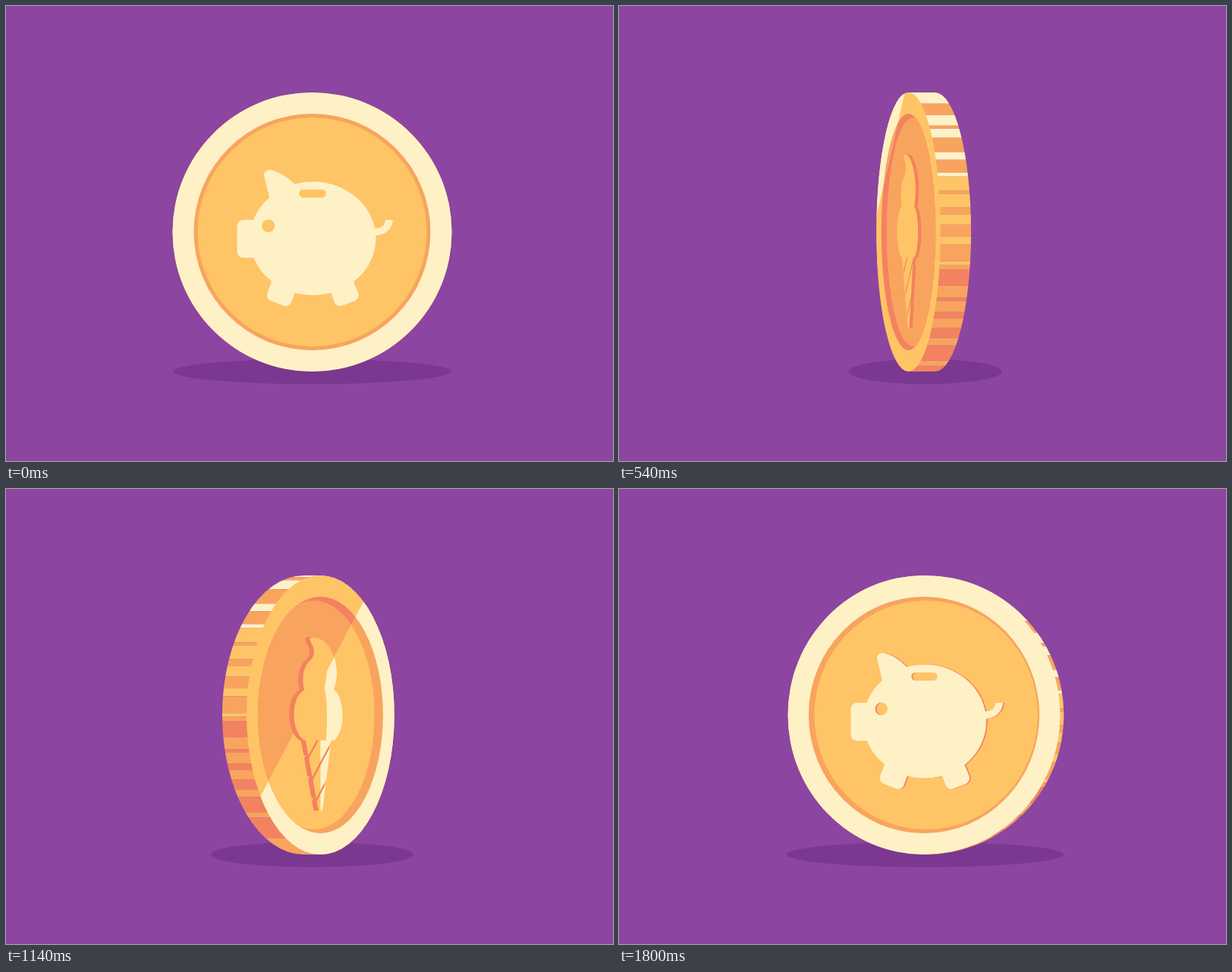
These frames come from a looping animation (800x600 px, 1.83 s). An HTML page with a canvas:

```html
<!DOCTYPE html>
<html lang="en">
<head>
<meta charset="utf-8">
<title>Spinning coin</title>
<style>
html, body { margin: 0; width: 100%; height: 100%; overflow: hidden; background: #8c45a0; }
canvas { display: block; width: 800px; height: 600px; }
</style>
</head>
<body>
<canvas id="stage" width="800" height="600"></canvas>
<script>
const ctx = document.getElementById('stage').getContext('2d');
const CX = 403.5, CY = 298, R = 184;
const BG = '#8c45a0', SHADE = '#7a3891';
const CREAM = '#fef1c6', YELLOW = '#ffc466', ORANGE = '#f8a45e', RED = '#f38260';
const DIM = { rim: YELLOW, wall: RED, floor: ORANGE };
const LIT = { rim: CREAM, wall: ORANGE, floor: YELLOW };

// Edge bands: colour and lower end, at the middle of the turn
const BANDS = [
  [CREAM, 108], [ORANGE, 123], [CREAM, 137], [ORANGE, 141], [CREAM, 153], [ORANGE, 172],
  [CREAM, 182], [ORANGE, 199], [CREAM, 204], [YELLOW, 223], [ORANGE, 227], [YELLOW, 245],
  [ORANGE, 254], [YELLOW, 268], [ORANGE, 283], [YELLOW, 294], [ORANGE, 316], [YELLOW, 321],
  [ORANGE, 327], [RED, 348], [ORANGE, 364], [RED, 368], [ORANGE, 383], [RED, 391],
  [ORANGE, 404], [RED, 417], [ORANGE, 427], [RED, 447], [ORANGE, 454], [RED, 481], [ORANGE, 700]
];

// Sideways drift of one disc through a full turn: step, pixels
const DRIFT = [
  [0, 0], [3, 4.5], [10, 13.5], [13, 17], [15, 18], [18, 13], [22, 8], [30, 0],
  [33, -2], [40, -14.5], [43, -20.5], [45, -23], [48, -22], [52, -14.5], [59, -1.5], [60, 0]
];

function drift(n) {
  n %= 60;
  const i = DRIFT.findIndex(k => k[0] > n);
  const [n0, a] = DRIFT[i - 1], [n1, b] = DRIFT[i];
  return a + (b - a) * (n - n0) / (n1 - n0);
}

// Symmetric cubic ease with handle length h
function ease(x, h) {
  let lo = 0, hi = 1;
  for (let i = 0; i < 30; i++) {
    const t = (lo + hi) / 2, u = 1 - t;
    const v = 3 * u * u * t * h + 3 * u * t * t * (1 - h) + t * t * t;
    if (v < x) lo = t; else hi = t;
  }
  return lo * lo * (3 - 2 * lo);
}

const squash = (m, h) => Math.abs(1 - 2 * ease(m / 30, h));

// Polygon with rounded corners; points are [x, y, radius]
function poly(p, pts) {
  const a = pts[pts.length - 1], b = pts[0];
  p.moveTo((a[0] + b[0]) / 2, (a[1] + b[1]) / 2);
  pts.forEach((q, i) => {
    const r = pts[(i + 1) % pts.length];
    if (q[2]) p.arcTo(q[0], q[1], r[0], r[1], q[2]);
    else p.lineTo(q[0], q[1]);
  });
  p.closePath();
}

function makePig() {
  const p = new Path2D();
  p.ellipse(1, 8.5, 83, 75, 0, 0, 7);
  p.closePath();
  poly(p, [[-99, -16, 8], [-70, -16], [-70, 34], [-99, 34, 8]]);
  // ear
  p.moveTo(-56, -44);
  p.lineTo(-63.5, -74);
  p.quadraticCurveTo(-64, -82, -55, -82);
  p.quadraticCurveTo(-39, -79, -23, -63);
  p.lineTo(-10, -30);
  p.closePath();
  // legs
  poly(p, [[-53, 64], [-22, 78], [-30, 100, 8], [-62, 88, 8]]);
  poly(p, [[54, 64], [64, 88, 8], [32, 100, 8], [24, 78]]);
  // tail
  p.moveTo(96.5, -16);
  p.lineTo(106.5, -16);
  p.bezierCurveTo(106, -4, 96, 5, 81, 5);
  p.lineTo(81, -5);
  p.bezierCurveTo(90, -4, 96, -8, 96.5, -16);
  p.closePath();
  // eye and slot run the other way round to stay open
  p.moveTo(-49.2, -8);
  p.arc(-57.7, -8, 8.5, 0, Math.PI * 2, true);
  p.closePath();
  p.moveTo(-12, -56);
  p.arc(-12, -50.8, 5.2, -Math.PI / 2, Math.PI / 2, true);
  p.lineTo(13, -45.6);
  p.arc(13, -50.8, 5.2, Math.PI / 2, -Math.PI / 2, true);
  p.closePath();
  return p;
}

function makeCone() {
  const p = new Path2D();
  p.moveTo(-26, -99);
  p.bezierCurveTo(-27, -103, -20, -103, -12, -102);
  p.bezierCurveTo(16, -100, 41, -79, 41, -55);
  p.quadraticCurveTo(40, -43, 33, -33);
  p.bezierCurveTo(46, -30, 55, -16, 55, 0);
  p.bezierCurveTo(55, 16, 47, 27, 35, 33.5);
  p.lineTo(-40, 33.5);
  p.bezierCurveTo(-56, 28, -66, 15, -66, 0);
  p.bezierCurveTo(-66, -17, -56, -29, -40, -33);
  p.bezierCurveTo(-47, -46, -43, -62, -31, -69);
  p.bezierCurveTo(-20, -75, -16, -77, -16, -84);
  p.bezierCurveTo(-16, -91, -23, -93, -26, -99);
  p.closePath();
  // wafer strips between diagonals x + y = s
  const left = s => { const y = (s + 48.35) / 1.344; return [s - y, y]; };
  const right = s => { const y = Math.max(33, (s - 34.82) / 0.763); return [s - y, y]; };
  poly(p, [[-37, 33], right(23.5), left(23.5)]);
  poly(p, [left(28.5), right(28.5), [27, 33], right(61.5), left(61.5)]);
  poly(p, [left(66.5), right(66.5), right(99.5), left(99.5)]);
  poly(p, [left(104.5), right(104.5), [5, 126, 2], [-5, 126, 2]]);
  return p;
}

function makeConeLight() {
  const p = new Path2D();
  p.moveTo(-22, -104);
  p.lineTo(-20, -100);
  p.bezierCurveTo(2, -98, 16, -84, 16, -66);
  p.quadraticCurveTo(16, -49, 10, -36);
  p.bezierCurveTo(17, -22, 18, 8, 14, 33.5);
  p.lineTo(0, 33.5);
  p.lineTo(0, 130);
  p.lineTo(80, 130);
  p.lineTo(80, -104);
  p.closePath();
  return p;
}

const PIG = makePig(), CONE = makeCone(), CONE_LIGHT = makeConeLight();

function disc(r, fill, x = 0) {
  ctx.beginPath();
  ctx.arc(x, 0, r, 0, Math.PI * 2);
  ctx.fillStyle = fill;
  ctx.fill();
}

function edge(front, fw, rear, rw, shift) {
  ctx.save();
  ctx.beginPath();
  ctx.ellipse(rear, CY, R * rw, R, 0, 0, Math.PI * 2);
  ctx.closePath();
  ctx.rect(Math.min(front, rear), CY - R, Math.abs(front - rear), 2 * R);
  ctx.moveTo(front + R * fw, CY);
  ctx.ellipse(front, CY, R * fw, R, 0, 0, Math.PI * 2);
  ctx.clip();
  let top = -100;
  for (const [fill, end] of BANDS) {
    ctx.fillStyle = fill;
    ctx.fillRect(200, top, 400, end + shift - top);
    top = end + shift;
  }
  ctx.restore();
}

function face(pal, floorX) {
  disc(R, pal.rim);
  disc(156, pal.wall);
  ctx.save();
  ctx.beginPath();
  ctx.arc(0, 0, 156, 0, Math.PI * 2);
  ctx.clip();
  disc(151, pal.floor, floorX);
  ctx.restore();
}

// Clip to one side of the diagonal x + y = s
function clipDiagonal(s, side) {
  const far = side * 900;
  ctx.beginPath();
  ctx.moveTo(s - 600, 600);
  ctx.lineTo(s + 600, -600);
  ctx.lineTo(s + 600 + far, -600 + far);
  ctx.lineTo(s - 600 + far, 600 + far);
  ctx.clip();
}

function emblem(shape, w, depth) {
  const steps = Math.ceil(Math.abs(depth) * 2);
  ctx.fillStyle = RED;
  for (let i = steps; i > 0; i--) {
    ctx.save();
    ctx.translate(depth * i / steps / w, 0);
    ctx.fill(shape);
    ctx.restore();
  }
  ctx.fillStyle = YELLOW;
  ctx.fill(shape);
}

function draw(n) {
  const m = n % 30, away = m < 15, side = away ? 1 : -1;
  const pigSide = n < 15 || n >= 45;
  const front = CX + drift(pigSide ? n : n + 30);
  const rear = CX + drift(pigSide ? n + 30 : n);
  const w = squash(m, 0.13), rw = squash(m, 0.23);
  const depth = -side * 8.7 * Math.pow(Math.abs(Math.sin(Math.PI * (15 - m) / 15)), 0.75);

  ctx.fillStyle = BG;
  ctx.fillRect(0, 0, 800, 600);
  ctx.fillStyle = SHADE;
  ctx.beginPath();
  ctx.ellipse(CX, 482, 138 + 45.6 * Math.cos(Math.PI * m / 15), 16.5, 0, 0, Math.PI * 2);
  ctx.fill();

  edge(front, w, rear, rw, 4.15 * (m - 13));
  if (w < 0.005) return;

  ctx.save();
  ctx.translate(front, CY);
  ctx.scale(w, 1);
  const line = away ? 47 + 44.5 * (m - 10) : -205 + 45 * (m - 18);
  const full = side * line < -260;
  if (!full) face(DIM, depth / w);
  ctx.save();
  if (!full) clipDiagonal(line, side);
  face(LIT, depth / w);
  ctx.restore();

  const shape = pigSide ? PIG : CONE;
  emblem(shape, w, depth * 0.72);
  if (pigSide) {
    const k = away ? Math.max(0, 22 * (m - 6.7)) : Math.min(0, 22 * (m - 23.9));
    if (k) {
      ctx.beginPath();
      ctx.arc(k, k, 106, 0, Math.PI * 2);
      ctx.clip();
    }
  } else {
    if (!full) clipDiagonal(line, side);
    ctx.clip(CONE_LIGHT);
  }
  ctx.fillStyle = CREAM;
  ctx.fill(shape);
  ctx.restore();
}

// 61 ticks of 30 ms cover 60 steps; the coin rests one tick edge-on
function tick() {
  const i = Math.floor(performance.now() % 1830 / 30);
  draw(i > 45 ? i - 1 : i);
  requestAnimationFrame(tick);
}
tick();
</script>
</body>
</html>
```
